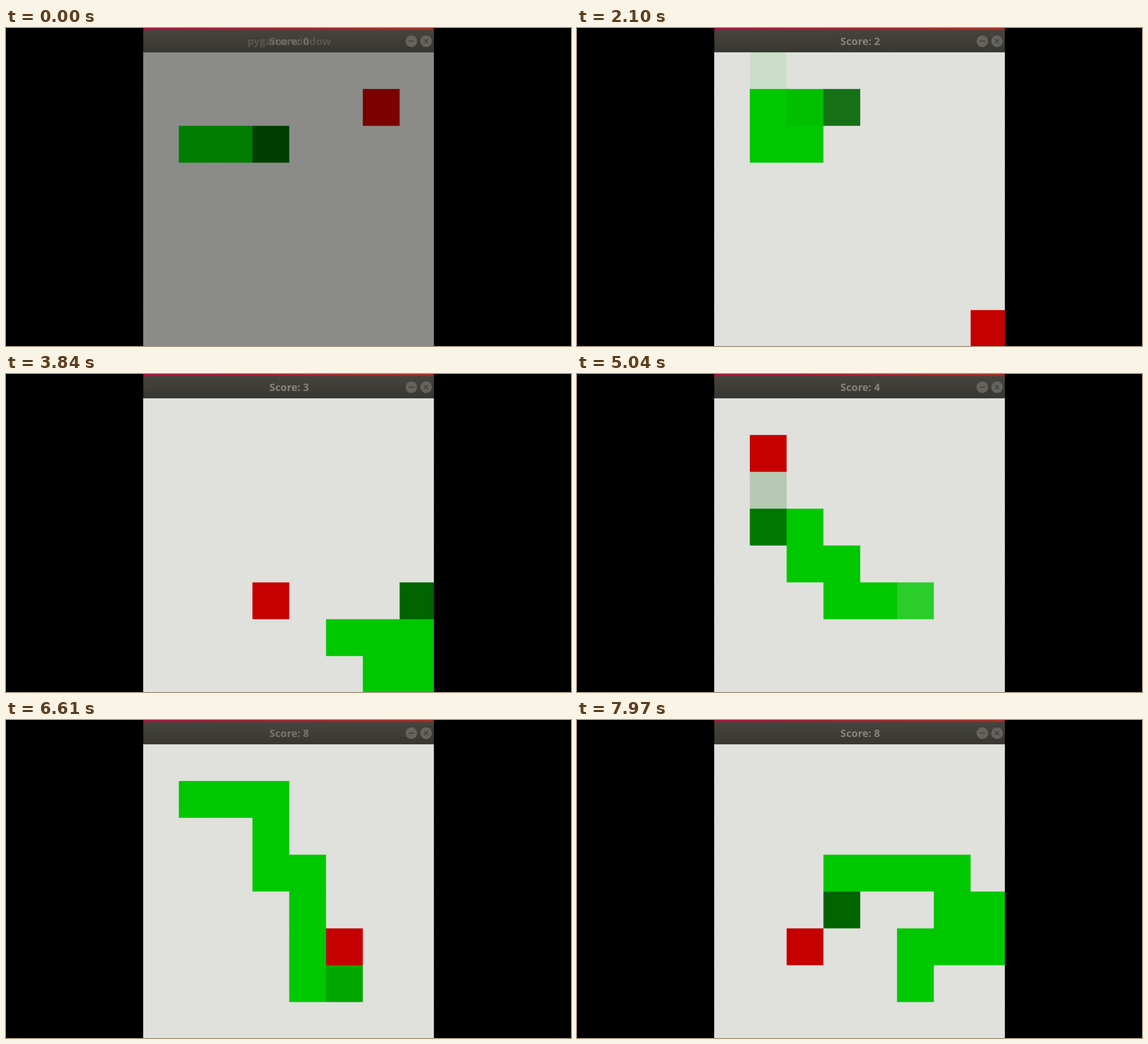
Recreate the animation shown at these times as an HTML page with a canvas. Size 998x561 px, loop 8 s.

```html
<!DOCTYPE html>
<html lang="en">
<head>
<meta charset="utf-8">
<title>Snake</title>
<style>
  html, body { margin: 0; width: 100%; height: 100%; overflow: hidden; background: #000; }
  canvas { display: block; }
</style>
</head>
<body>
<canvas id="stage" width="998" height="561"></canvas>
<script>
const ctx = document.getElementById('stage').getContext('2d');
const LOOP = 8000, FRAME = 100 / 3, BLEND = 33;
const CELL = 65, GRID = 8, LEFT = 240.3, TOP = 42.6;
const WIN = { x: 242.3, right: 755.8, w: 513.5 };

const BLACK = [0, 0, 0], FLOOR = [224, 224, 221];
const HEAD = [0, 100, 0], BODY = [0, 200, 0], RED = [198, 0, 0];

// Head positions: two tail cells, the start, then one per move.
const MOVES = 'RRRULLLLULDDRURDDDDRDRRDRUULLLLULULUURRDDRDDDRURRULULLLD';
const DIRS = { R: [1, 0], L: [-1, 0], U: [0, -1], D: [0, 1] };
const path = [[1, 2], [2, 2], [3, 2]];
for (const m of MOVES) {
  const [x, y] = path[path.length - 1];
  path.push([x + DIRS[m][0], y + DIRS[m][1]]);
}
const EATEN = [4, 10, 25, 31, 37, 41, 44, 47];
const LAST_FRUIT = [2, 5];

// [move, time in ms] at the middle of its cross-fade
const BEATS = [[0, -4], [9, 1244.9], [21, 2928.7], [36, 5043.6], [47, 6594], [56, 7862]];

function moveTime(k) {
  const i = Math.max(1, BEATS.findIndex(b => b[0] >= k));
  const [k0, t0] = BEATS[i - 1], [k1, t1] = BEATS[i];
  return t0 + (t1 - t0) * (k - k0) / (k1 - k0);
}

const score = k => EATEN.filter(e => e <= k).length;
const caption = k => k < 0 ? 'pygame window' : 'Score: ' + score(k);

function board(k) {
  const cells = Array(GRID * GRID).fill(k < 0 ? BLACK : FLOOR);
  if (k < 0) return cells;
  const put = ([x, y], color) => { cells[y * GRID + x] = color; };
  const head = k + 2, tail = head - 2 - score(k);
  for (let i = tail; i < head; i++) put(path[i], BODY);
  put(path[head], HEAD);
  // The fruit covers the head during the move that eats it.
  const next = EATEN.find(e => e >= k);
  put(next === undefined ? LAST_FRUIT : path[next + 2], RED);
  return cells;
}

function mix(a, b, p) {
  return `rgb(${a.map((v, i) => Math.round(v + (b[i] - v) * p))})`;
}

function gradient(x0, y0, x1, y1, from, to) {
  const g = ctx.createLinearGradient(x0, y0, x1, y1);
  g.addColorStop(0, from);
  g.addColorStop(1, to);
  return g;
}

function drawButton(x, glyph) {
  ctx.fillStyle = '#64635d';
  ctx.beginPath();
  ctx.arc(x, 23.2, 10.3, 0, Math.PI * 2);
  ctx.fill();
  ctx.strokeStyle = '#3b3a36';
  ctx.lineWidth = 1.5;
  ctx.beginPath();
  for (const [x0, y0, x1, y1] of glyph) {
    ctx.moveTo(x + x0, 23.2 + y0);
    ctx.lineTo(x + x1, 23.2 + y1);
  }
  ctx.stroke();
}

function drawTitle(text, alpha) {
  ctx.globalAlpha = alpha;
  ctx.fillStyle = '#85837d';
  ctx.fillText(text, 500.3, 29.5);
  ctx.globalAlpha = 1;
}

function drawBar(k, p) {
  ctx.fillStyle = gradient(WIN.x, 0, WIN.right, 0, '#a5143c', '#a62c22');
  ctx.fillRect(WIN.x, 0, WIN.w, 12);
  ctx.fillStyle = gradient(0, 4, 0, TOP, '#45443e', '#373631');
  ctx.beginPath();
  ctx.roundRect(WIN.x, 3.5, WIN.w + 8, TOP - 3.5, [6, 0, 0, 0]);
  ctx.fill();
  drawButton(716, [[-5, 0, 5, 0]]);
  drawButton(742, [[-3.5, -3.5, 3.5, 3.5], [-3.5, 3.5, 3.5, -3.5]]);
  ctx.font = 'bold 18.3px "Open Sans", "Noto Sans", sans-serif';
  ctx.textAlign = 'center';
  const before = caption(k - 1), now = caption(k);
  if (before !== now && p < 1) {
    drawTitle(before, 1 - p);
    drawTitle(now, p);
  } else {
    drawTitle(now, 1);
  }
}

function draw(time) {
  const t = Math.floor((time + 7) / FRAME) * FRAME;
  let k = MOVES.length;
  while (k > 0 && moveTime(k) - BLEND / 2 > t) k--;
  const p = Math.min(1, (t - moveTime(k)) / BLEND + 0.5);

  ctx.fillStyle = '#000';
  ctx.fillRect(0, 0, 998, 561);
  ctx.save();
  ctx.beginPath();
  ctx.rect(WIN.x, 0, WIN.w, 561);
  ctx.clip();
  // Cells overlap by a pixel so that soft edges leave no seams.
  const from = board(k - 1), to = board(k);
  to.forEach((color, i) => {
    ctx.fillStyle = mix(from[i], color, p);
    ctx.fillRect(LEFT + i % GRID * CELL, TOP + Math.floor(i / GRID) * CELL, CELL + 1, CELL + 1);
  });
  drawBar(k, p);
  ctx.restore();
}

const start = performance.now();
function tick() {
  draw((performance.now() - start) % LOOP);
  requestAnimationFrame(tick);
}
tick();
</script>
</body>
</html>
```
